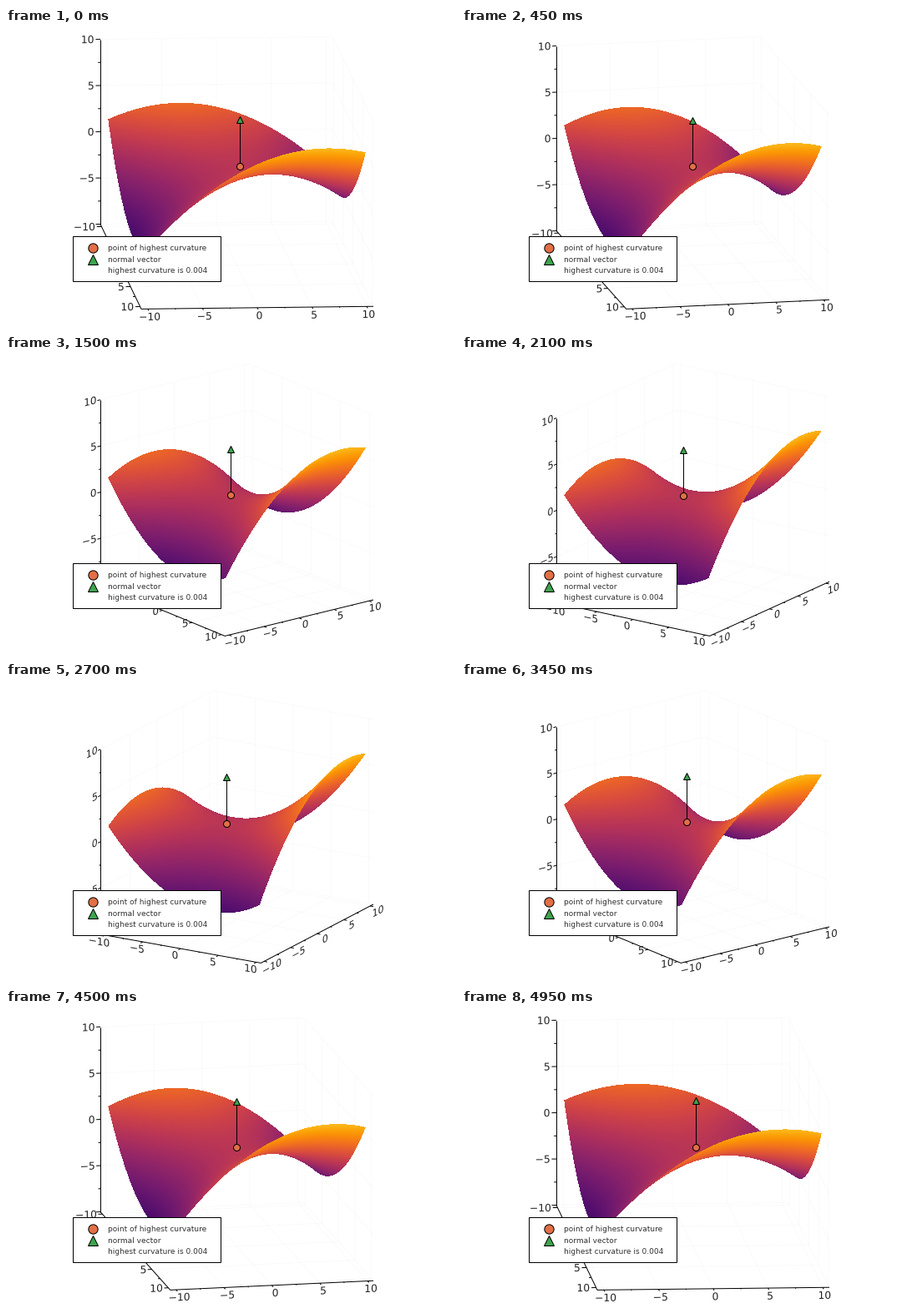
Animation of 539x359 px, one loop 5000 ms. Source, as a matplotlib script:

```python
import numpy as np
import matplotlib
import matplotlib.pyplot as plt
from matplotlib.animation import FuncAnimation
from matplotlib.collections import LineCollection
from matplotlib.patches import PathPatch, Rectangle
from matplotlib.path import Path
from matplotlib.textpath import TextPath

plt.rcParams["font.family"] = "DejaVu Sans"

W, H, DPI = 539, 359, 100
PX = 72 / DPI                    # one pixel in points
FRAMES, INTERVAL = 100, 50

LEFT, TOP = 113.0, 10.4          # corner of the projected box
SPAN, ZH, DEPTH = 327.0, 222.0, 105.0
LIM, EDGE, ZLIM = 10.6, 10.0, 10.0
MAJOR = np.linspace(-10, 10, 5)
MINOR = np.linspace(-7.5, 7.5, 4)
ORANGE, GREEN = "#E26F46", "#3DA44D"
INFERNO = matplotlib.colormaps["inferno"]

SADDLE_P, SADDLE_Q = -1.8, 0.6
TEXT_SIZE, DIGIT_H = 12.3, 9.0
SIDE_PAD, BELOW_PAD = 0.03, 0.05


def surface(p, q):
    return (p * p - q * q + p * q + 3 * (p + q)) / 25


def unit(v):
    """Floor coordinate to a 0..1 share of the box side."""
    return (v / LIM + 1) / 2


def zunit(z):
    return (z / ZLIM + 1) / 2


class View:
    """Oblique projection of the box for one azimuth; p runs to the front, q to the right."""

    def __init__(self, degrees):
        a = np.radians(degrees)
        self.degrees = degrees
        self.c, self.s = np.cos(a), np.sin(a)
        self.base = TOP + DEPTH * self.s**2 + ZH
        w = SPAN / (self.s + self.c)
        self.p = np.array([w * self.s, DEPTH * self.c**2])
        self.q = np.array([w * self.c, -DEPTH * self.s**2])

    def at(self, P, Q, Z):
        return np.array([LEFT, self.base - ZH * Z]) + P * self.p + Q * self.q


def render(view):
    """Cast one ray per pixel at the quadratic surface and keep the nearest hit."""
    c, s = view.c, view.s
    X, Y = np.meshgrid(np.arange(W) + 0.5, np.arange(H) + 0.5)
    f = (X - LEFT) / SPAN
    p0, m, k = LIM * (2 * f - 1), 2 * LIM, 2 * ZLIM / ZH
    z0 = (view.base - ZH / 2 + DEPTH * (c * c - s * s) * f - Y) * k
    z1 = DEPTH * (c**3 + s**3) * k
    A = m * m * (c * c - s * s - c * s) / 25
    B = m * (p0 * (3 * c + s) + 3 * (c - s)) / 25 - z1
    C = (p0 * p0 + 6 * p0) / 25 - z0
    root = np.sqrt(np.maximum(B * B - 4 * A * C, 0))
    real = B * B >= 4 * A * C
    best = np.full(X.shape, -np.inf)
    for sign in (-1, 1):
        t = (-B + sign * root) / (2 * A)
        p, q = p0 + m * c * t, p0 - m * s * t
        hit = real & (np.abs(p) <= EDGE) & (np.abs(q) <= EDGE)
        best = np.where(hit & (t > best), t, best)
    seen = np.isfinite(best)
    z = z0 + z1 * np.where(seen, best, 0)
    rgba = INFERNO(zunit(z))
    rgba[..., 3] = seen
    return rgba


def grid_lines(view):
    at, lines = view.at, []
    for v in MAJOR:
        u, h = unit(v), zunit(v)
        for ends in (((u, 0, 0), (u, 1, 0), (u, 1, 1)),
                     ((1, u, 0), (0, u, 0), (0, u, 1)),
                     ((0, 0, h), (0, 1, h), (1, 1, h))):
            lines.append([at(*e) for e in ends])
    return lines


def axis_lines(view):
    at = view.at
    lines = [[at(0, 0, 1), at(0, 0, 0)],
             [at(0, 0, 0), at(1, 0, 0), at(1, 1, 0)]]
    for ticks, size in ((MAJOR, 0.02), (MINOR, 0.01)):
        for v in ticks:
            u = unit(v)
            for start, step in ((at(0, 0, zunit(v)), -view.q),
                                (at(u, 0, 0), -view.q),
                                (at(1, u, 0), view.p)):
                lines.append([start, start + size * step])
    return lines


def glyphs(v):
    path = TextPath((0, 0), f"{v:.0f}".replace("-", "\u2212"), size=TEXT_SIZE)
    box = path.get_extents()
    return path, box.x0, box.x1


GLYPHS = {v: glyphs(v) for v in MAJOR}


def label(v, anchor, along, centred):
    """Tick label whose baseline follows a box side while its stems stay upright."""
    path, x0, x1 = GLYPHS[v]
    d = along / np.hypot(*along)
    x = path.vertices[:, 0] - ((x0 + x1) / 2 if centred else x1)
    y = path.vertices[:, 1] - DIGIT_H / 2
    verts = np.column_stack([anchor[0] + x * d[0], anchor[1] + x * d[1] - y])
    return Path(verts, path.codes)


def tick_labels(view):
    at, parts = view.at, []
    down = np.array([0, 4.0])
    left = np.array([SIDE_PAD * view.q[0], 0])
    for v in MAJOR:
        u = unit(v)
        if v > -ZLIM:            # the corner belongs to the floor axis
            parts.append(label(v, at(0, 0, zunit(v)) - left, view.q, False))
        parts.append(label(v, at(1, u, 0) + BELOW_PAD * view.p + down,
                           view.q, True))
        start = at(u, 0, 0)
        if view.degrees < 45:
            parts.append(label(v, start - left, view.q, False))
        else:
            parts.append(label(v, start - BELOW_PAD * view.q + down,
                               view.p, True))
    return Path.make_compound_path(*parts)


fig = plt.figure(figsize=(W / DPI, H / DPI), dpi=DPI, facecolor="white")
ax = fig.add_axes([0, 0, 1, 1])
ax.axis("off")

image = ax.imshow(np.zeros((H, W, 4)), extent=(0, W, H, 0), aspect="auto",
                  interpolation="nearest", zorder=2)
grid = LineCollection([], colors=[(0, 0, 0, 0.02)], linewidths=PX, zorder=1)
axes = LineCollection([], colors="black", linewidths=PX, zorder=1.5)
ax.add_collection(grid, autolim=False)
ax.add_collection(axes, autolim=False)
labels = PathPatch(Path([(0, 0)]), fc="#222222", lw=0, zorder=1.6)
ax.add_patch(labels)


def marker(x, y, shape, size, color, z):
    return ax.plot([x], [y], shape, ms=size * PX, mfc=color, mec="black",
                   mew=PX, zorder=z, snap=False)[0]


stem, = ax.plot([], [], color="black", lw=PX, zorder=3)
dot = marker(0, 0, "o", 8, ORANGE, 4)
tip = marker(0, 0, "^", 8.5, GREEN, 4)

# legend
ax.add_patch(Rectangle((80, 250), 177, 54, fc="white", ec="black",
                       lw=PX, zorder=5))
marker(104.2, 264.3, "o", 11.3, ORANGE, 6)
marker(104.2, 278.3, "^", 11.3, GREEN, 6)
for y, line in ((267, "point of highest curvature"),
                (281, "normal vector"),
                (294.5, "highest curvature is 0.004")):
    ax.text(122, y, line, fontsize=9 * PX, color="#333333",
            va="baseline", zorder=6)

ax.set_xlim(0, W)
ax.set_ylim(H, 0)


def update(i):
    view = View(10 + min(i, FRAMES - 1 - i))
    image.set_data(render(view))
    grid.set_segments(grid_lines(view))
    axes.set_segments(axis_lines(view))
    labels.set_path(tick_labels(view))
    z = surface(SADDLE_P, SADDLE_Q)
    foot, head = (view.at(unit(SADDLE_P), unit(SADDLE_Q), zunit(h))
                  for h in (z, z + 5))
    stem.set_data([foot[0], head[0]], [foot[1], head[1]])
    dot.set_data([foot[0]], [foot[1]])
    tip.set_data([head[0]], [head[1]])
    return image, grid, axes, labels, stem, dot, tip


anim = FuncAnimation(fig, update, frames=FRAMES, interval=INTERVAL,
                     repeat=True, repeat_delay=0)
plt.show()
```
